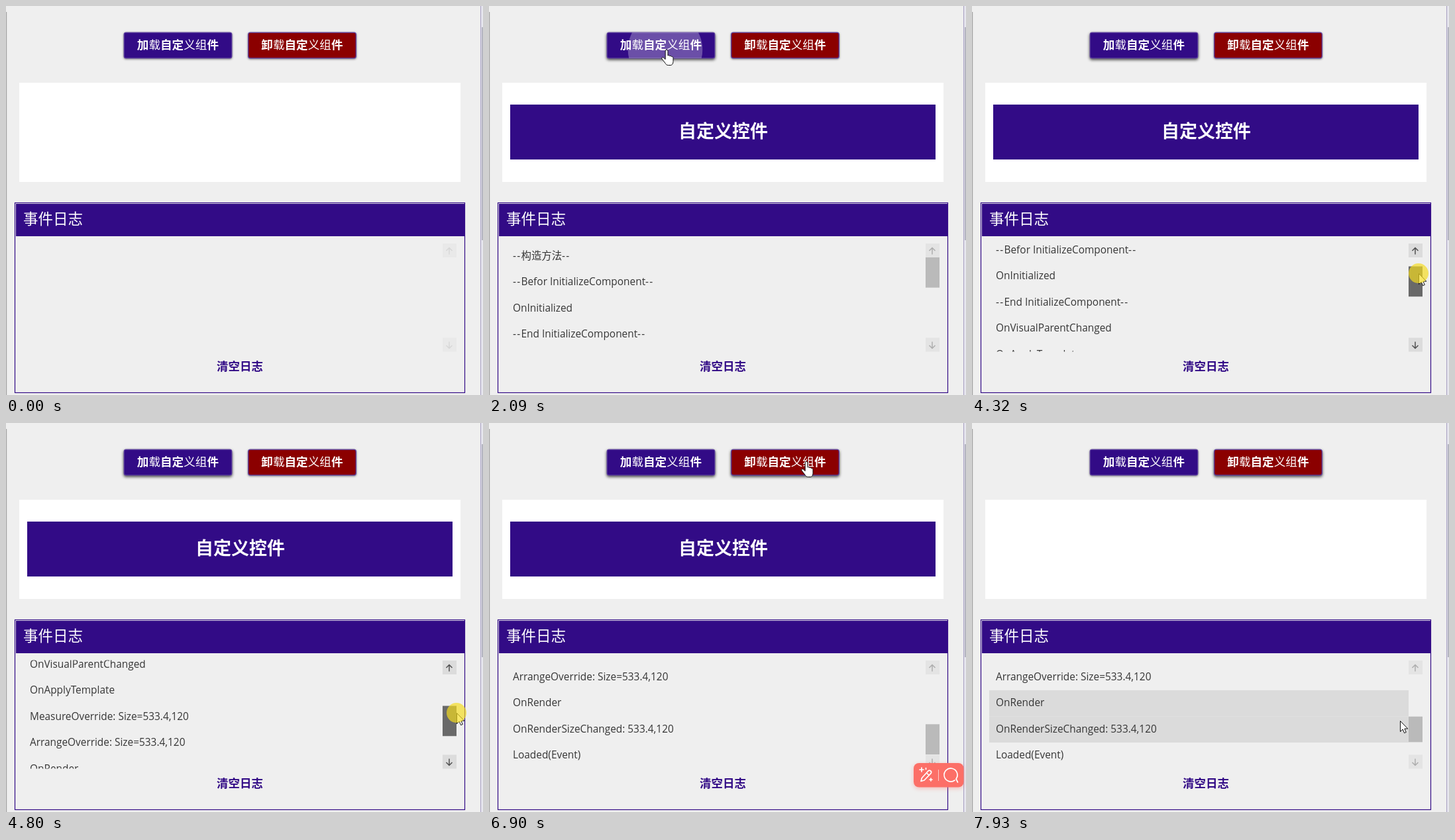
An HTML page that plays this animation: 720 px wide and 588 px high, repeating every 8 s.

```html
<!DOCTYPE html>
<html lang="zh-CN">
<head>
<meta charset="utf-8">
<style>
  html, body { margin: 0; width: 100%; height: 100%; overflow: hidden; background: #efefef; }
  svg { display: block; width: 720px; height: 588px; }
  text { font-family: 'Noto Sans CJK SC', 'Noto Sans CJK', sans-serif; white-space: pre; }
  .button { stroke: #5b3c9f; stroke-width: 1.3; filter: drop-shadow(0 1px 1.6px rgba(0,0,0,.5)); }
  .button.raised { filter: drop-shadow(0 2px 2px rgba(0,0,0,.72)); }
  .label { fill: #fff; font-size: 17.6px; font-weight: 700; }
  .thin { font-weight: 300; }
  .row text { font: 15.4px 'Open Sans', 'Noto Sans CJK SC', sans-serif; fill: #363636; }
  .dash { letter-spacing: 1.3px; }
  .row rect { fill: #dbdbdb; }
  .arrow { fill: none; stroke-width: 1.5; }
  .icon { fill: none; stroke: #fff; stroke-width: 1.7; stroke-linecap: round; stroke-linejoin: round; }
  #cursor path { fill: #fff; stroke: #111; stroke-width: 1; stroke-linejoin: round; }
</style>
</head>
<body>
<svg viewBox="0 0 720 588">
  <defs>
    <clipPath id="listClip"><rect x="26" y="358.5" width="633" height="164"/></clipPath>
    <clipPath id="buttonClip">
      <rect x="178" y="40" width="163" height="39" rx="3"/>
      <rect x="365.5" y="40" width="163" height="39" rx="3"/>
    </clipPath>
  </defs>

  <rect width="720" height="588" fill="#efefef"/>
  <rect y="9" width="1.2" height="579" fill="#a2a2a2"/>
  <rect x="716" width="1.4" height="588" fill="#aaa3c4"/>
  <rect x="717.4" width="2.6" height="588" fill="#e6e6ee"/>
  <rect x="718" y="32" width="2" height="322" fill="#b4b4c0"/>

  <rect id="load" class="button" x="178.2" y="40.2" width="162.6" height="38.6" rx="3" fill="#320b86"/>
  <rect id="unload" class="button" x="365.7" y="40.2" width="162.6" height="38.6" rx="3" fill="#8b0000"/>
  <g clip-path="url(#buttonClip)"><circle id="ripple" fill="#fff"/></g>
  <text class="label" x="197.8" y="64.8">加<tspan class="thin">载</tspan>自定<tspan class="thin">义组</tspan>件</text>
  <text class="label" x="385.3" y="64.8">卸<tspan class="thin">载</tspan>自定<tspan class="thin">义组</tspan>件</text>

  <rect x="20" y="116" width="666" height="150" fill="#fff"/>
  <g id="banner">
    <rect x="32" y="149" width="642" height="83" fill="#320b86"/>
    <text x="353.5" y="198.5" text-anchor="middle" font-size="27" font-weight="700" fill="#fff">自定义控件</text>
  </g>

  <rect x="13.5" y="297.5" width="679" height="287" fill="none" stroke="#320b86" stroke-width="1.2"/>
  <rect x="15" y="299" width="677.5" height="49" fill="#320b86"/>
  <text x="26" y="330" font-size="22.5" fill="#fff">事件日志</text>
  <g id="list" clip-path="url(#listClip)"></g>
  <text x="353" y="551" text-anchor="middle" font-size="17.5" font-weight="700" fill="#320b86">清空日志</text>

  <g id="scrollbar">
    <rect class="end" x="659" y="359" width="21" height="21"/>
    <rect class="end" x="659" y="501.5" width="21" height="21"/>
    <path class="arrow" d="M669 375.5V365.5M664.5 370L669 365.5L673.5 370"/>
    <path class="arrow" d="M669 507.5V517.5M664.5 513L669 517.5L673.5 513"/>
    <rect id="thumb" x="659" width="21"/>
  </g>

  <g id="widget">
    <rect x="641" y="514" width="75.5" height="36.5" rx="8" fill="#fc6f67" style="filter:drop-shadow(0 2px 3px rgba(252,111,103,.4))"/>
    <path class="icon" d="M652 541.5l1.4-5 9.5-10.5q2-1.6 3.8 0t.3 3.7L657 540zM660.5 529l3.8 3.6M653 521v6M650 524h6M659.500 521.500v2M667 537v4M665 539h4"/>
    <path d="M678.5 524v17" stroke="#fff" stroke-opacity=".65"/>
    <path class="icon" d="M703 540a10 10 0 1 1 2-2l2.500 5"/>
  </g>

  <g id="cursor">
    <path id="pointer" d="M.5 .5V16.500l3.700-3.500 2.400 5.600 2.700-1.200-2.400-5.300h4.900z"/>
    <path id="hand" d="M.2 2a1.900 1.900 0 0 1 3.800 0V9c1-.9 2.700-.5 3 .9 1-.8 2.500-.4 2.800.9 1-.6 2.200.2 2.200 1.900v4.800c0 3.800-1.600 6-4 6H4.500c-2.300 0-3.500-1.300-4.500-3.200l-4.900-6.200c-1.200-2 .8-3.300 2.300-2l2.800 2.400z"/>
  </g>
  <circle id="press" r="15" fill="#f4dc1e" fill-opacity=".68"/>
</svg>

<script>
const $ = id => document.getElementById(id);
const LOOP = 8000, LOAD = 2090, UNLOAD = 7300;
const ROW = 39.5, TOP = 358.5, VIEW = 164, TRACK = 121, TRACK_TOP = 380;
const lines = [
  '--构造方法--', '--Befor InitializeComponent--', 'OnInitialized', '--End InitializeComponent--',
  'OnVisualParentChanged', 'OnApplyTemplate', 'MeasureOverride: Size=533.4,120',
  'ArrangeOverride: Size=533.4,120', 'OnRender', 'OnRenderSizeChanged: 533.4,120', 'Loaded(Event)',
  'OnVisualParentChanged', 'Unloaded(Event)'
];
const LOADED_ROWS = 11;

// Cursor path: time, x, y
const path = [
  [200, 616, 509], [400, 545, 405], [680, 360, 170], [850, 285, 88], [960, 264, 69], [1100, 266, 66],
  [2110, 266, 66], [2250, 300, 105], [2500, 460, 255], [2740, 625, 375], [2890, 672, 386], [2960, 676, 385],
  [3180, 671, 388], [3380, 671, 388], [3440, 670, 389],
  [3980, 670, 389], [4320, 674, 404], [4800, 680, 438], [5330, 682, 476], [5620, 684, 493],
  [5820, 684, 493], [6050, 672, 440], [6250, 640, 350], [6480, 580, 225], [6550, 561, 185], [6630, 526, 145],
  [6770, 490, 78], [6900, 477, 58],
  [7440, 477, 58], [7560, 515, 160], [7700, 580, 345], [7800, 617, 425], [7930, 646, 450]
];

function cursorAt(t) {
  const next = path.findIndex(p => p[0] > t);
  if (next < 1) return path[next ? path.length - 1 : 0].slice(1);
  const [t0, x0, y0] = path[next - 1], [t1, x1, y1] = path[next];
  const k = (t - t0) / (t1 - t0);
  return [x0 + (x1 - x0) * k, y0 + (y1 - y0) * k];
}

$('list').innerHTML = lines.map((line, i) => `<g class="row" transform="translate(26 ${TOP + i * ROW})">
  <rect width="633" height="${ROW}"/>
  <text x="10" y="24.3">${line.replace(/--/g, '<tspan class="dash">--</tspan>')}</text></g>`).join('');
const rows = [...document.querySelectorAll('.row')];
const list = $('list'), content = document.createElementNS('http://www.w3.org/2000/svg', 'g');
content.append(...rows);
list.append(content);

const show = (el, on) => el.style.display = on ? '' : 'none';
const within = (t, from, to) => t >= from && t < to;
const place = (el, x, y) => el.setAttribute('transform', `translate(${x} ${y})`);

function scrollAt(t) {
  if (t < 3980) return 0;
  const total = LOADED_ROWS * ROW;
  const drag = t < 5820 ? cursorAt(t)[1] - 390.5 : TRACK;
  return Math.min(total - VIEW, Math.max(0, drag) * total / TRACK);
}

function hoveredRow(t) {
  const [x, y] = cursorAt(t);
  if (t < LOAD || x < 26 || x > 659 || y < TOP || y > TOP + VIEW) return -1;
  return Math.floor((y - TOP + scrollAt(t)) / ROW);
}

function drawRipple(t) {
  const start = t < UNLOAD ? LOAD : UNLOAD, age = t - start;
  show($('ripple'), within(age, 0, 330));
  const [x, y] = cursorAt(start);
  const attrs = { cx: x, cy: y, r: 56 + age * .28, opacity: Math.max(0, .28 * (1 - age / 330)) };
  for (const name in attrs) $('ripple').setAttribute(name, attrs[name]);
}

function drawScrollbar(t, x, y, scroll, count) {
  const loaded = t >= LOAD, dragging = within(t, 3840, 5850);
  const hover = dragging || loaded && x > 659 && x < 681 && y > TOP && y < TOP + VIEW;
  const [end, arrow] = hover ? ['#dcdcdc', '#505050'] : loaded ? ['#e4e4e4', '#adadad'] : ['#e9e9e9', '#d7d7d7'];
  document.querySelectorAll('.end').forEach(el => el.style.fill = end);
  document.querySelectorAll('.arrow').forEach(el => el.style.stroke = arrow);
  const thumb = $('thumb'), scale = TRACK / (count * ROW);
  show(thumb, loaded);
  thumb.setAttribute('y', TRACK_TOP + scroll * scale);
  thumb.setAttribute('height', VIEW * scale);
  thumb.style.fill = dragging ? '#696969' : hover ? '#999' : '#bababa';
}

function draw(t) {
  const [x, y] = cursorAt(t);
  const inButtons = y > 40 && y < 80;
  const onLoad = inButtons && x > 178 && x < 341, onUnload = inButtons && x > 365 && x < 529;
  const scroll = scrollAt(t);
  const count = t < LOAD ? 0 : t < UNLOAD ? LOADED_ROWS : lines.length;

  $('load').classList.toggle('raised', onLoad || within(t, 1760, 7150));
  $('unload').classList.toggle('raised', onUnload || t >= 7150);
  show($('banner'), within(t, LOAD, UNLOAD));
  drawRipple(t);

  place(content, 0, -scroll);
  const lit = [hoveredRow(t), hoveredRow(t - 150)];
  rows.forEach((row, i) => {
    show(row, i < count);
    show(row.firstElementChild, lit.includes(i));
  });
  drawScrollbar(t, x, y, scroll, count || 1);

  show($('widget'), within(t, 6000, 7200));
  show($('cursor'), t >= 200);
  show($('hand'), onLoad || onUnload);
  show($('pointer'), !(onLoad || onUnload));
  place($('cursor'), x, y);
  show($('press'), within(t, 1760, 1890) || within(t, 3770, 5680) || within(t, 7080, 7200));
  place($('press'), x, y);
}

const begin = performance.now();
function tick() {
  draw((performance.now() - begin) % LOOP);
  requestAnimationFrame(tick);
}
tick();
</script>
</body>
</html>
```
